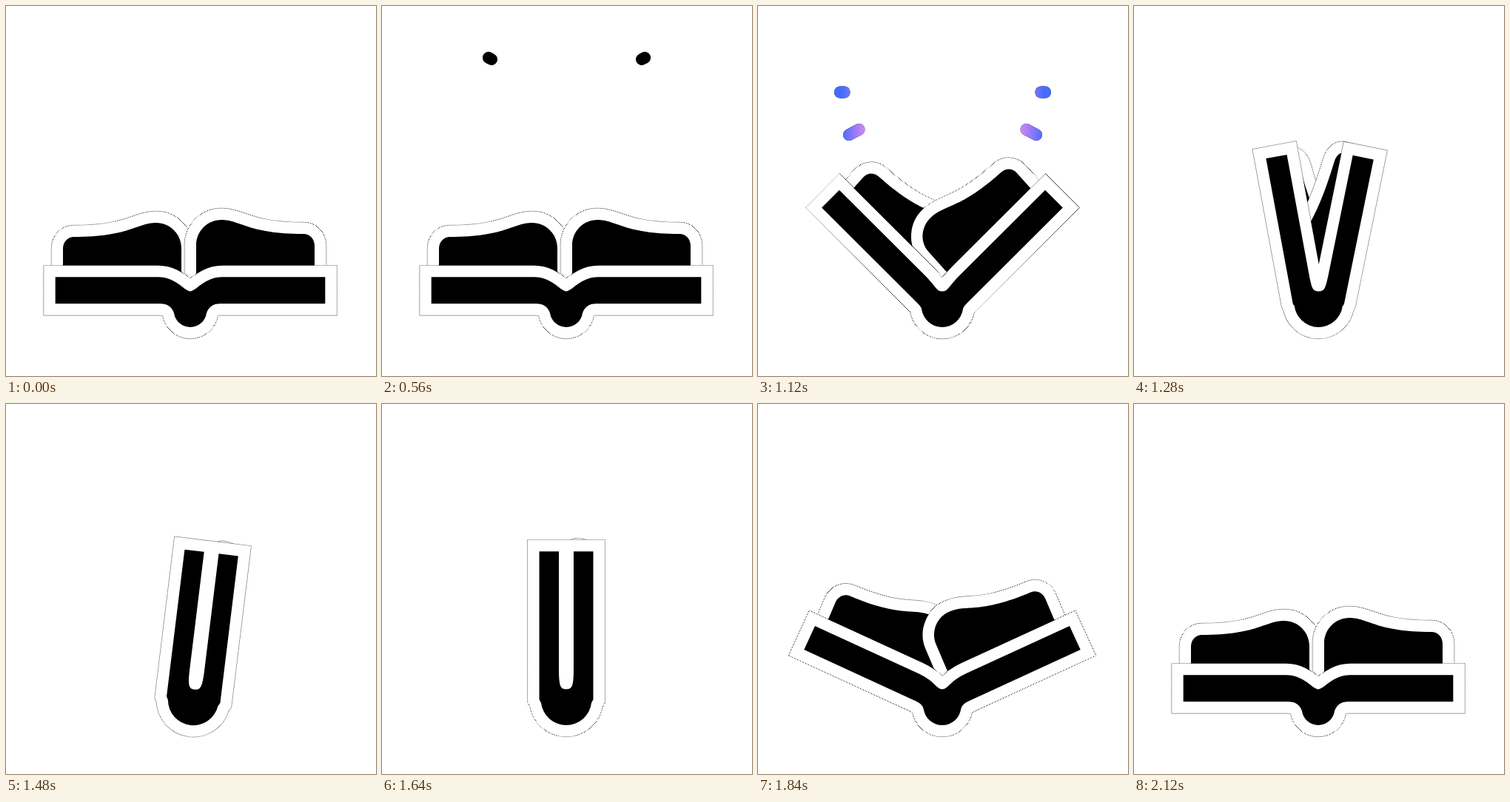
These frames come from a looping animation (500 by 500 pixels, 2400 ms). An HTML page:

```html
<!DOCTYPE html>
<html lang="en">
<head>
<meta charset="utf-8">
<title>Book</title>
<style>
  html, body { margin: 0; width: 100%; height: 100%; overflow: hidden; background: #fff; }
  svg { display: block; width: 100%; height: 100%; }
  .edge { fill: none; stroke: url(#dots); stroke-width: 32.4; }
  .rim { fill: #000; stroke: #fff; stroke-width: 31; paint-order: stroke; }
  .page { stroke-linejoin: round; }
  .cover { stroke-linejoin: miter; stroke-miterlimit: 2; }
  .spark { stroke-width: 16; stroke-linecap: round; }
</style>
</head>
<body>
<svg viewBox="0 0 500 500">
  <defs id="defs">
    <pattern id="dots" width="2" height="2" patternUnits="userSpaceOnUse">
      <path d="M0 0h1v1h1v1h-1v-1h-1z"/>
    </pattern>
  </defs>
  <g id="sparks"></g>
  <g id="book"></g>
</svg>
<script>
const LOOP = 2400, STEP = 40;
const CENTER = 249, HINGE = 400, NOTCH = 385.5, BOTTOM = 434;

const clamp = v => Math.max(0, Math.min(1, v));
const mix = (a, b, t) => a + (b - a) * t;
const span = (t, start, length) => clamp((t - start) / length);
const easeOut = t => 1 - Math.pow(1 - t, 2.4);
const smooth = t => t * t * (3 - 2 * t);
const radians = degrees => degrees * Math.PI / 180;
const along = ([x, y], [dx, dy], length) => [x + dx * length, y + dy * length];

function set(el, attrs) {
  for (const key in attrs) el.setAttribute(key, attrs[key]);
  return el;
}
function add(parent, tag, attrs) {
  const el = document.createElementNS("http://www.w3.org/2000/svg", tag);
  return document.getElementById(parent).appendChild(set(el, attrs));
}

// One cover arm, x relative to the centre; p runs from flat (0) to closed (1).
function arm(p) {
  const turn = radians(90 * (1 - p));
  const dir = [Math.sin(turn), -Math.cos(turn)];
  const inward = [dir[1], -dir[0]];
  const angle = radians(mix(85.1, 6.6, p ** 1.05));
  const reach = mix(183, 202, p) + 13 * Math.sin(Math.PI * p);
  const half = mix(36, 26.5, p * p) / 2;
  const tip = [reach * Math.sin(angle), HINGE - reach * Math.cos(angle)];
  const innerTip = along(tip, inward, half), outerTip = along(tip, inward, -half);
  const innerRoot = along(innerTip, dir, 44 - reach);
  const outerRoot = along(outerTip, dir, -mix(142, 200, Math.sin(p * Math.PI / 2)));
  return {
    innerTip, outerTip, innerRoot, outerRoot,
    innerBend: along(innerRoot, dir, -24),
    outerBend: along(outerRoot, dir, -14 * (1 - p)),
    bump: [mix(22, 34, p), mix(415, 404, p)]
  };
}

function coverPath(p) {
  const a = arm(p);
  const at = side => ([x, y]) => `${CENTER + side * x} ${y} `;
  const r = at(1), l = at(-1);
  const notch = [0, NOTCH], notchBend = [8, NOTCH];
  const depth = BOTTOM - a.bump[1];
  const radius = (a.bump[0] ** 2 + depth ** 2) / (2 * depth);
  return "M" + r(notch) + "C" + r(notchBend) + r(a.innerBend) + r(a.innerRoot) +
    "L" + r(a.innerTip) + r(a.outerTip) + r(a.outerRoot) + "Q" + r(a.outerBend) + r(a.bump) +
    `A${radius} ${radius} 0 0 1 ` + l(a.bump) + "Q" + l(a.outerBend) + l(a.outerRoot) +
    "L" + l(a.outerTip) + l(a.innerTip) + l(a.innerRoot) +
    "C" + l(a.innerBend) + l(notchBend) + l(notch) + "Z";
}

// A page turns rigidly about its foot and thins out as the book shuts.
function pagePath(p, side) {
  const turn = radians(84 * p), cos = Math.cos(turn), sin = Math.sin(turn);
  const thin = 1 - 0.85 * p ** 4;
  const shift = side < 0 ? 4 + 4 * p : 0;
  const footX = 8 - 4 * p + shift, footY = 362 - 5 * p + shift;
  const at = (x, up) => {
    const y = -up * thin;
    return `${CENTER + side * (footX + x * cos + y * sin)} ${footY - x * sin + y * cos} `;
  };
  const width = 160, dome = 73, rim = 54, round = 34;
  return "M" + at(0, 0) + "L" + at(0, dome - round) +
    "C" + at(0, dome - round * 0.45) + at(round * 0.45, dome) + at(round, dome) +
    "C" + at(60, dome) + at(70, rim) + at(width - 15, rim) +
    "C" + at(width - 6, rim) + at(width, rim - 7) + at(width, rim - 16) +
    "L" + at(width, 0) + "Z";
}

function layer(kind) {
  const parts = ["edge", "rim"].map(c => add("book", "path", { class: c + " " + kind }));
  return d => parts.forEach(el => set(el, { d }));
}
const drawLeftPage = layer("page"), drawRightPage = layer("page"), drawCover = layer("cover");

// Three rows fan out on each side; every spark is black first, then tinted.
const sparks = [];
for (const side of [-1, 1]) {
  const flip = x => side < 0 ? x : 499 - x;
  const id = side < 0 ? "tintLeft" : "tintRight";
  add("defs", "linearGradient",
    { id, gradientUnits: "userSpaceOnUse", x1: flip(150), x2: flip(113), y1: 0, y2: 0 })
    .innerHTML = '<stop stop-color="#ee8cf2"/><stop offset="1" stop-color="#456cff"/>';
  for (const row of [0, 1, 2]) {
    const fan = row - 1, outer = Math.abs(fan);
    ["#000", `url(#${id})`].forEach((stroke, pass) => sparks.push({
      from: [flip(138 + 10 * outer), 116.5 + 44.5 * fan],
      to: [flip(111 + 12 * outer), 116.5 + 57.5 * fan],
      start: 520 + 80 * row + 120 * pass,
      erase: 850 + 80 * row,
      el: add("sparks", "line", { class: "spark", stroke })
    }));
  }
}

function drawSpark({ from, to, start, erase, el }, t) {
  const head = span(t, start, 240), tail = span(t, erase, 240);
  set(el, {
    visibility: head > 0 && tail < 1 && head >= tail ? "visible" : "hidden",
    x1: mix(from[0], to[0], tail), y1: mix(from[1], to[1], tail),
    x2: mix(from[0], to[0], head), y2: mix(from[1], to[1], head)
  });
}

function draw(t) {
  sparks.forEach(spark => drawSpark(spark, t));
  const p = easeOut(span(t, 1000, 480)) - easeOut(span(t, 1640, 480));
  const tilt = 7 * (smooth(span(t, 1240, 240)) - smooth(span(t, 1480, 160)));
  drawLeftPage(pagePath(p, -1));
  drawRightPage(pagePath(p, 1));
  drawCover(coverPath(p));
  set(document.getElementById("book"), { transform: `rotate(${tilt} ${CENTER} ${BOTTOM})` });
}

const began = performance.now();
function tick() {
  const t = (performance.now() - began) % LOOP;
  draw(Math.floor(t / STEP) * STEP);
  requestAnimationFrame(tick);
}
tick();
</script>
</body>
</html>
```
